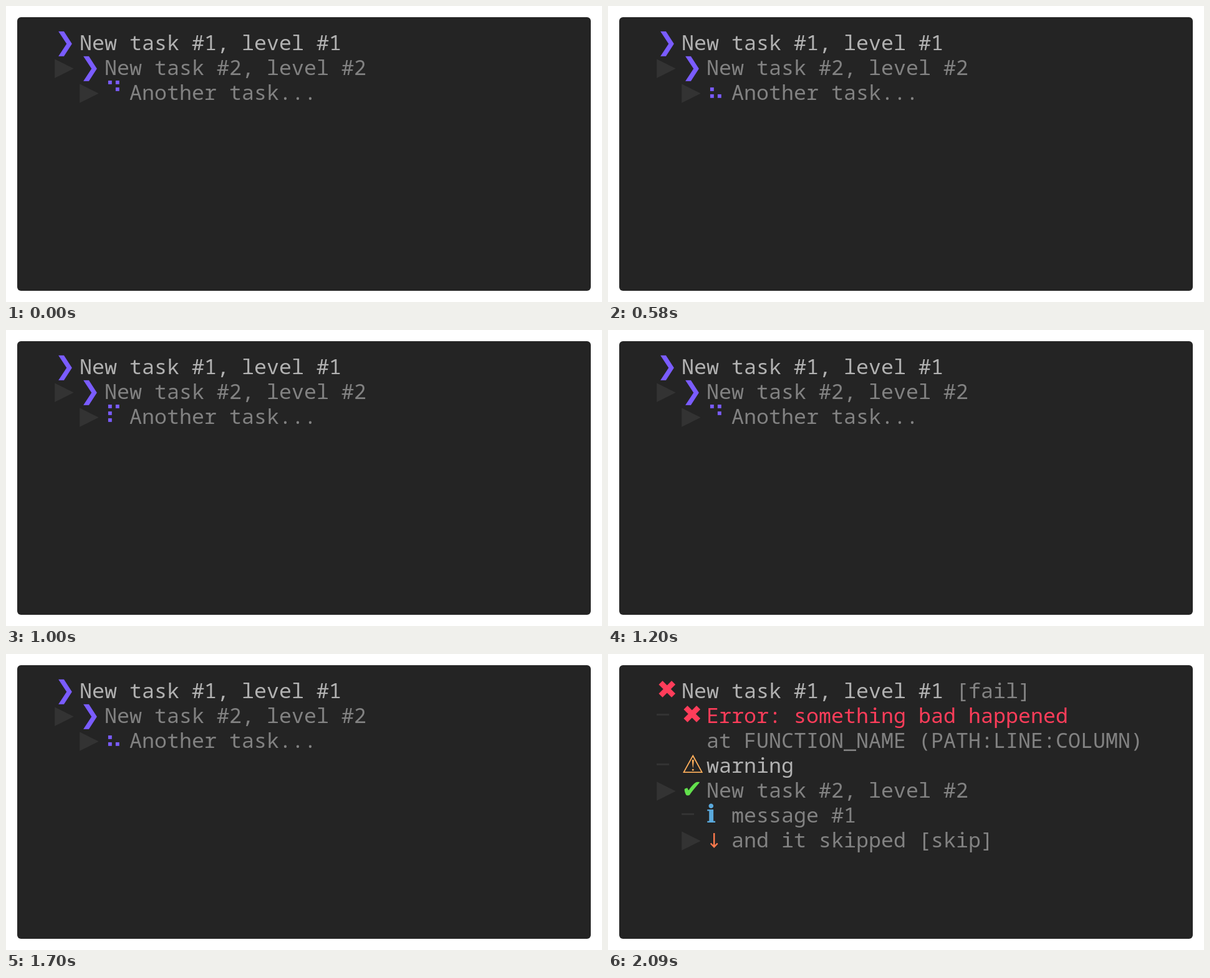
These frames come from a looping animation (956x476 px, 9290 ms). An HTML page with a canvas:

```html
<!DOCTYPE html>
<html lang="en">
<head>
<meta charset="utf-8">
<title>Task list</title>
<style>
html, body { margin: 0; width: 100%; height: 100%; overflow: hidden; background: #fff; }
canvas { display: block; width: 956px; height: 476px; }
</style>
</head>
<body>
<canvas id="stage"></canvas>
<script>
const LOOP = 9290, DONE = 2090;
const TICKS = [180, 280, 380, 480, 580, 700, 790, 1000];
const SPINNER = [...'⠋⠙⠹⠸⠼⠴⠦⠧⠇⠏'];
const CELL = 20, ROW = 40, LEFT = 38, BASE = 71;
const TEXT_FONT = '33.333px "Noto Sans Mono", monospace';
const ICON_FONT = '40px "DejaVu Sans", sans-serif';
const C = {
  panel: '#242424', faint: '#333333', dim: '#828282', text: '#b2b2b2', accent: '#7a5cff',
  fail: '#ff3d5a', warn: '#ffb05c', ok: '#62e04c', info: '#5aa9dc', skip: '#ff7a4d'
};

const canvas = document.getElementById('stage');
const ratio = window.devicePixelRatio || 1;
canvas.width = 956 * ratio;
canvas.height = 476 * ratio;
const ctx = canvas.getContext('2d');
ctx.scale(ratio, ratio);

const xAt = col => LEFT + col * CELL;
const yAt = row => BASE + row * ROW;

function put(font, str, col, row, color) {
  ctx.font = font;
  ctx.fillStyle = color;
  ctx.fillText(str, xAt(col), yAt(row));
}
const text = (...args) => put(TEXT_FONT, ...args);
const icon = (...args) => put(ICON_FONT, ...args);
const branch = (col, row) => icon('▶', col, row, C.faint);

function dash(col, row) {
  ctx.fillStyle = C.faint;
  ctx.fillRect(xAt(col), yAt(row) - 15, CELL, 3);
}

function downArrow(col, row) {
  const x = xAt(col) + 12.2, y = yAt(row);
  ctx.strokeStyle = C.skip;
  ctx.lineWidth = 2.4;
  ctx.beginPath();
  ctx.moveTo(x, y - 23);
  ctx.lineTo(x, y - 1);
  ctx.moveTo(x - 5.5, y - 6.5);
  ctx.lineTo(x, y - 0.8);
  ctx.lineTo(x + 5.5, y - 6.5);
  ctx.stroke();
}

function spinnerStep(t) {
  if (t >= 1000) return 9 + Math.floor((t - 1000) / 100);
  return 1 + TICKS.filter(tick => t >= tick).length;
}

function drawRunning(t) {
  icon('❯', 2, 0, C.accent);
  text('New task #1, level #1', 4, 0, C.text);
  branch(2, 1);
  icon('❯', 4, 1, C.accent);
  text('New task #2, level #2', 6, 1, C.dim);
  branch(4, 2);
  icon(SPINNER[spinnerStep(t) % SPINNER.length], 6, 2, C.accent);
  text('Another task...', 8, 2, C.dim);
}

function drawDone() {
  icon('✖', 2, 0, C.fail);
  text('New task #1, level #1', 4, 0, C.text);
  text('[fail]', 26, 0, C.dim);
  dash(2, 1);
  icon('✖', 4, 1, C.fail);
  text('Error: something bad happened', 6, 1, C.fail);
  text('at FUNCTION_NAME (PATH:LINE:COLUMN)', 6, 2, C.dim);
  dash(2, 3);
  icon('⚠', 4, 3, C.warn);
  text('warning', 6, 3, C.text);
  branch(2, 4);
  icon('✔', 4, 4, C.ok);
  text('New task #2, level #2', 6, 4, C.dim);
  dash(4, 5);
  icon('ℹ', 6, 5, C.info);
  text('message #1', 8, 5, C.dim);
  branch(4, 6);
  downArrow(6, 6);
  text('and it skipped [skip]', 8, 6, C.dim);
}

function draw(t) {
  ctx.fillStyle = '#fff';
  ctx.fillRect(0, 0, 956, 476);
  ctx.fillStyle = C.panel;
  ctx.beginPath();
  ctx.roundRect(18, 18, 920, 440, 6);
  ctx.fill();
  if (t < DONE) drawRunning(t);
  else drawDone();
}

const start = performance.now();
function frame() {
  draw((performance.now() - start) % LOOP);
  requestAnimationFrame(frame);
}
draw(0);
requestAnimationFrame(frame);
</script>
</body>
</html>
```
